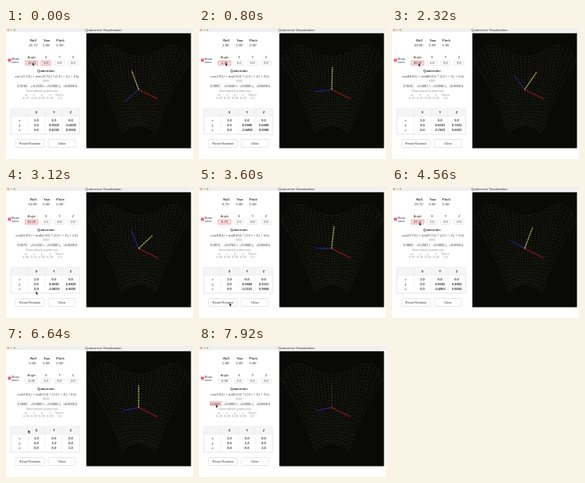
An HTML page that plays this animation: 234 px wide and 164 px high, repeating every 8000 ms.

```html
<!DOCTYPE html>
<html lang="en">
<head>
<meta charset="utf-8">
<title>Quaternion Visualization</title>
<style>
html, body { margin: 0; width: 100%; height: 100%; overflow: hidden; background: #fff; }
svg { display: block; width: 234px; height: 164px; }
text { font: 4px "Liberation Sans", Arial, sans-serif; fill: #333; text-anchor: middle; }
.bold { font-weight: 700; }
.math { font: italic 4.3px "Liberation Serif", serif; }
.soft { fill: #999; }
</style>
</head>
<body>
<svg id="stage" viewBox="0 0 234 164"></svg>
<script>
const LOOP = 8000, STEP = 80;
const stage = document.getElementById('stage');

function add(tag, attrs, content) {
  const el = document.createElementNS('http://www.w3.org/2000/svg', tag);
  for (const key in attrs) el.setAttribute(key, attrs[key]);
  if (content !== undefined) el.textContent = content;
  return stage.appendChild(el);
}
const rect = (x, y, width, height, fill, more) => add('rect', { x, y, width, height, fill, ...more });
const label = (x, y, content, cls = '', more) => add('text', { x, y, class: cls, ...more }, content);
const set = (el, attrs) => { for (const key in attrs) el.setAttribute(key, attrs[key]); };

// Linear interpolation through [time, value, value...] stops
function track(stops, t) {
  let i = 1;
  while (i < stops.length - 1 && stops[i][0] <= t) i++;
  const a = stops[i - 1], b = stops[i];
  const k = Math.min(1, Math.max(0, (t - a[0]) / (b[0] - a[0])));
  return a.slice(1).map((v, n) => v + (b[n + 1] - v) * k);
}

// Window
rect(0, 0, 234, 164, '#fff');
rect(0, 0, 234, 5, '#f0efef');
['#f26458', '#f3bd4d', '#64c454'].forEach((fill, i) => add('circle', { cx: 2.7 + i * 3.9, cy: 2.5, r: 1.1, fill }));
label(122, 4, 'Quaternion Visualization', '', { style: 'font-size:4.2px' });

// Euler angles
const euler = ['Roll', 'Yaw', 'Pitch'].map((name, i) => {
  const x = 34 + i * 17;
  label(x, 16.5, name, 'bold');
  return label(x, 22.5, '0.00°');
});

// Axis and angle
rect(2.5, 38.5, 3.7, 3.7, '#e0455e', { rx: .7 });
add('path', { d: 'M3.3 40.4l.8 .9 1.3-1.9', fill: 'none', stroke: '#fff', 'stroke-width': .5 });
label(11.5, 40, 'Show');
label(11.5, 44, 'axes');
const axisX = [32, 50, 67, 84];
const inputs = ['Angle', 'X', 'Y', 'Z'].map((name, i) => {
  label(axisX[i], 38.2, name);
  const box = rect(axisX[i] - (i ? 6 : 8), 41, i ? 12 : 16, 5.5, '#fff', { stroke: '#ccc', 'stroke-width': .4 });
  return { box, text: label(axisX[i], 45.3, ['', '1.0', '0.0', '0.0'][i]) };
});

// Quaternion
label(50, 55, 'Quaternion', 'bold');
const formula = label(51, 61.7, '', 'math');
add('path', { d: 'M46 65.2h8M46 66.8h8', stroke: '#888', 'stroke-width': .45 });
const quatX = [21, 41, 61, 82];
const quat = quatX.map((x, i) => {
  const box = rect(x - 7, 69.3, 14, 5.5, '#fff', { stroke: '#ddd', 'stroke-width': .3 });
  if (i) label(x - 9.2, 73.5, '+');
  return { box, text: label(x - .6, 73.5, '') };
});
label(45, 80.3, 'Normalized quaternion', 'soft');
const normX = [25, 35, 45, 55, 67];
const norm = ['w', 'x', 'y', 'z', 'Norm'].map((name, i) => {
  label(normX[i], 84.5, name, 'soft');
  return label(normX[i], 88.7, '', 'soft');
});

// Rotation matrix
rect(6, 101, 86, 32, '#fff', { stroke: '#ccc', 'stroke-width': .5 });
rect(6.3, 101.3, 85.4, 9, '#f5f5f5');
add('path', { d: 'M6 110.3H92M27 101V133M49 101V133M70 101V133', stroke: '#ddd', 'stroke-width': .4 });
const cells = ['x', 'y', 'z'].map((name, row) => {
  label([38, 60, 81][row], 107.3, name.toUpperCase(), 'bold');
  label(17, 116.5 + row * 6, name);
  return [38, 60, 81].map(x => label(x, 116.5 + row * 6, '', 'bold'));
});

// Buttons
[[12, 36, 'Reset Rotation'], [53, 34, 'Clear']].forEach(([x, w, name]) => {
  rect(x, 139.5, w, 10, '#fff', { rx: 1.5, stroke: '#ccc', 'stroke-width': .5 });
  label(x + w / 2, 146, name);
});

// Scene
rect(100.5, 6.5, 131, 144, '#090a06');
function meshPoint(u, v) {
  const top = 36 - 62 * u * u + 68 * u ** 4;
  const fade = (1 - v) ** 1.6;
  const y = 36 + 86 * v + (top - 36) * fade + 10 * u * u * v - 28 * u * u * v * (1 - v);
  return [166.5 + u * (64 - 43 * v), y];
}
let mesh = '';
const line = point => {
  for (let i = 0; i <= 40; i++) mesh += (i ? 'L' : 'M') + point(i / 40).map(n => n.toFixed(2)).join(' ');
};
for (let i = 0; i <= 24; i++) {
  line(s => meshPoint(s * 2 - 1, i / 24));
  line(s => meshPoint(i / 12 - 1, s));
}
add('path', { d: mesh, fill: 'none', stroke: '#858461', 'stroke-width': .5, 'stroke-dasharray': '.6 2.1', opacity: .8 });

const ray = (stroke, dash) => add('path', { stroke, 'stroke-width': 1.1, 'stroke-dasharray': dash });
const red = ray('#b51d1d', '2 .6');
const blue = ray('#2430b0', '2 .6');
const yellow = ray('#eee36a', '1.8 .9');
const rayTo = (x, y) => `M166 77l${x.toFixed(2)} ${y.toFixed(2)}`;
red.setAttribute('d', rayTo(24, 12));

const cursor = add('path', { d: 'M0 0v4.2l1-.9.7 1.6.8-.4-.7-1.5h1.3z', fill: '#111', stroke: '#fff', 'stroke-width': .3 });

const angleStops = [[0, -25.71], [400, -25.71], [720, 0], [1440, 25.71], [1760, 28], [2320, 48],
  [2800, 62], [3120, 62], [3200, 0], [5440, 49], [5680, 49], [5760, 0], [8000, 0]];
const cursorStops = [[0, 33, 43], [2640, 33, 44], [3200, 38, 145], [3680, 38, 145], [4300, 34, 44],
  [5120, 34, 44], [5440, 65, 126], [5720, 36, 146], [6240, 36, 145], [6960, 21, 73], [8000, 21, 73]];

function draw(now) {
  const t = Math.floor((now % LOOP) / STEP) * STEP;
  const deg = track(angleStops, t)[0];
  const a = deg * Math.PI / 180, c = Math.cos(a), s = Math.sin(a);
  const cleared = t >= 7360;
  const editing = t >= 7040;

  euler[0].textContent = deg.toFixed(2) + '°';
  inputs[0].text.textContent = deg.toFixed(2);
  inputs.forEach(({ box }, i) => {
    const active = i === 0 ? t < 5680 : i === 1 && t < 400;
    set(box, { fill: active ? '#ffd9dc' : '#fff', stroke: active ? '#d96a70' : '#ccc' });
  });

  const half = `${deg.toFixed(1)}/2`;
  formula.textContent = `cos(${half}) + sin(${half}) * (1.0 i + 0 j + 0 k)`;
  const q = [cleared ? 0 : Math.cos(a / 2), Math.sin(a / 2), 0, 0];
  quat.forEach(({ box, text }, i) => {
    const active = editing && i === 0;
    set(box, { fill: active ? '#ffd9dc' : '#fff', stroke: active ? '#d96a70' : '#ddd' });
    text.textContent = q[i].toFixed(4) + ['', ' i', ' j', ' k'][i];
  });
  norm.forEach((el, i) => { el.textContent = i < 4 ? q[i].toFixed(2) : cleared ? '0.0' : '1.0'; });

  const matrix = [[1, 0, 0], [0, c, s], [0, -s, c]];
  cells.forEach((row, i) => row.forEach((el, j) => {
    const v = matrix[i][j];
    el.textContent = v.toFixed(v % 1 ? 4 : 1);
  }));

  set(yellow, { d: rayTo(20 * s, -28 * c - 4 * s), opacity: cleared ? .18 : 1 });
  set(blue, { d: rayTo(-20 * c, 4 * c - 28 * s) });
  set(cursor, { transform: `translate(${track(cursorStops, t)})` });
}

const start = performance.now();
function tick() {
  draw(performance.now() - start);
  requestAnimationFrame(tick);
}
tick();
</script>
</body>
</html>
```
